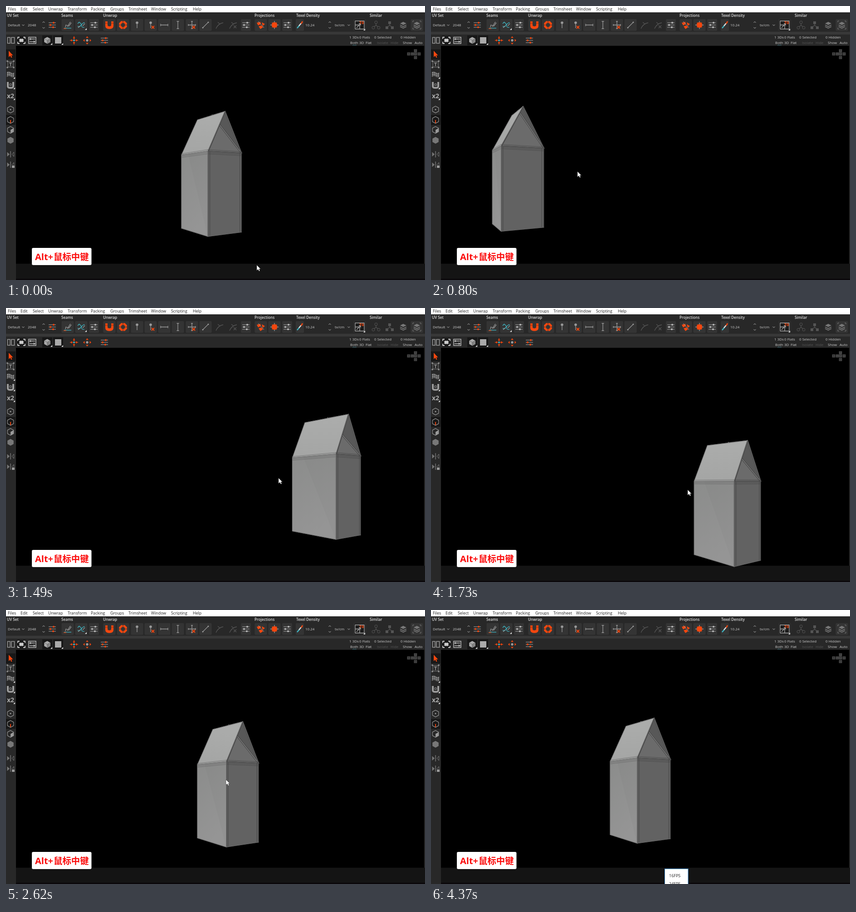
Write an HTML page that moves like this. It is 924x606 px and loops after 4660 ms.

```html
<!DOCTYPE html>
<html lang="en">
<head>
<meta charset="utf-8">
<title>Viewport panning</title>
<style>
html, body { margin: 0; height: 100%; overflow: hidden; background: #000 }
svg { display: block; width: 100vw; height: 100vh; font: 8px "Open Sans", "Noto Sans", sans-serif }
</style>
</head>
<body>
<svg id="stage" viewBox="0 0 924 606" preserveAspectRatio="none">
  <defs>
    <linearGradient id="wall" x2="0.35" y2="1"><stop stop-color="#8b8c8b"/><stop offset="1" stop-color="#959595"/></linearGradient>
    <linearGradient id="roof" x2="0" y2="1"><stop stop-color="#acadac"/><stop offset="1" stop-color="#a4a5a4"/></linearGradient>
  </defs>
  <g id="ui"></g>
  <g id="carton" stroke-linejoin="round" stroke-linecap="round"></g>
  <g id="popup">
    <rect x="515.5" y="572.5" width="51.5" height="40" fill="#fff" stroke="#3c8edb"/>
    <g fill="#222" font-size="9"><text x="525" y="591.3">16FPS</text><text x="525" y="609.3">24FPS</text></g>
  </g>
  <path id="cursor" d="M0 0V12L3 9.4 5 13.6 7 12.7 5.2 8.7H8.6Z" fill="#fff" stroke="#222" stroke-width=".5"/>
</svg>
<script>
const $ = id => document.getElementById(id);
const ORANGE = '#f4470f', GREY = '#9a9a9a', DIM = '#555', CYAN = '#3fb7c4';

// ---- static interface ----
const rect = (x, y, w, h, fill, more = '') => `<rect x="${x}" y="${y}" width="${w}" height="${h}" fill="${fill}" ${more}/>`;
const text = (x, y, s, fill = '#ccc', more = '') => `<text x="${x}" y="${y}" fill="${fill}" ${more}>${s}</text>`;
const dot = (x, y, r, fill) => `<circle cx="${x}" cy="${y}" r="${r}" fill="${fill}"/>`;
const stroke = (d, color = GREY, w = 1.3) => `<path d="${d}" fill="none" stroke="${color}" stroke-width="${w}"/>`;
const fill = (d, color) => `<path d="${d}" fill="${color}"/>`;
const at = (x, y, ...parts) => `<g transform="translate(${x} ${y})">${parts.join('')}</g>`;
const row = (y, items, color, more) => items.map(([x, s]) => text(x, y, s, color, more)).join('');
const button = (x, w = 27) => rect(x - w / 2, 29, w, 26, '#343434', 'rx="2"');
const chevron = (x, y, dir = 1) => at(x, y, stroke(`M-2.5 ${-dir}L0 ${1.5 * dir} 2.5 ${-dir}`, '#bbb', 1));
const sliders = (x, y, knob = '#bbb') => at(x, y,
  stroke('M-8-5H8M-8 0H8M-8 5H8', '#aaa', 1.2), dot(3, -5, 2, knob), dot(-4, 0, 2, knob), dot(2, 5, 2, knob));
const cross = (x, y) => at(x, y, stroke('M-3-3L3 3M3-3L-3 3', ORANGE, 1.8));
const corner = (x, y) => fill(`M${x} ${y}h-4l4-4z`, '#ddd');
const hexagon = 'M0-7.5L6.8-3.8V3.8L0 7.5-6.8 3.8V-3.8Z';
const arrows = inward => [0, 90, 180, 270].map(a => `<g transform="rotate(${a})">` +
  fill(inward ? 'M-2.7-6H-.8V-9H.8V-6H2.7L0-2.5Z' : 'M0-9L3-5.5H-3Z', ORANGE) + '</g>').join('');
const layers = x => at(x, 42, fill('M0-7L7-3.5 0 0-7-3.5Z', '#777'),
  stroke('M-7 0L0 3.5 7 0M-7 3.5L0 7 7 3.5', '#777', 1.8));

const panels = rect(0, 0, 924, 14, '#fff') + rect(0, 14, 924, 43, '#282828') + rect(0, 57, 924, 6, '#383838') +
  rect(0, 63, 924, 25, '#282828') + rect(0, 88, 22, 518, '#282828') + rect(22, 570, 902, 36, '#141414') +
  rect(22, 603, 902, 3, '#0b080b') + rect(922, 88, 2, 482, '#242424');

const labels =
  row(10.4, [[4, 'Files'], [32, 'Edit'], [59, 'Select'], [93, 'Unwrap'], [136, 'Transform'], [187, 'Packing'], [230, 'Groups'],
    [270, 'Trimsheet'], [320, 'Window'], [364, 'Scripting'], [412, 'Help']], '#222', 'font-size="8.8"') +
  row(23.8, [[2, 'UV Set'], [122, 'Seams'], [214, 'Unwrap'], [548, 'Projections'], [640, 'Texel Density'], [802, 'Similar']],
    '#ddd', 'font-weight="600" font-size="8.2"') +
  row(45, [[4, 'Default'], [48, '2048'], [660, '10.24'], [725, 'tx/cm']]) +
  row(72, [[757, '1 3Ds'], [779, '0 Flats'], [812, '0 Selected'], [870, '0 Hidden']]) +
  row(84, [[759, 'Both'], [779, '3D'], [793, 'Flat'], [875, 'Show'], [901, 'Auto']]) +
  row(84, [[818, 'Isolate'], [848, 'Hide']], DIM) + rect(764, 86, 9, 1, '#3d707a');

const topIcons =
  chevron(38, 42) + chevron(83, 36, -1) + chevron(83, 48) + chevron(714, 36, -1) + chevron(714, 48) + chevron(756, 42) +
  sliders(102, 42, ORANGE) +
  [136, 166, 228, 258, 289, 319, 349, 379, 410, 440, 562, 592, 780, 906].map(x => button(x)).join('') +
  [194, 529, 620].map(x => button(x, 22) + sliders(x, 42)).join('') + button(648, 18) +
  at(136, 42, stroke('M-8 7H8', CYAN), stroke('M-5 5L-4 0 2 2M-1 4L6-7M2 3L8-5'), stroke('M-9 8H-3', ORANGE)) +
  at(166, 42, stroke('M-7-5Q-1-7 0 0T7 5M-7 2Q-7 8 0 0T7-4M-8-3L-4-7', CYAN), stroke('M3 2L8-3M-7 6L-3 2')) + corner(178, 53) +
  at(228, 42, fill('M-9-8H-4V0Q-4 3 0 3T4 0V-8H9V2Q9 9 0 9T-9 2Z', ORANGE), stroke('M-9-4H-4M4-4H9', '#8d2a0a', 1)) +
  at(258, 42, stroke('M-3-6.5H3L6.5-3V3L3 6.5H-3L-6.5 3V-3Z', ORANGE, 4.5), stroke('M-9 0H-4M4 0H9M0-9V-4M0 4V9', '#343434', 1)) +
  [289, 319].map(x => at(x, 42, dot(0, -5, 2.8, GREY), stroke('M0-4V7'))).join('') + cross(324, 47) +
  at(349, 42, stroke('M-8 0H8M-8-2.5V2.5M8-2.5V2.5')) +
  at(379, 42, stroke('M0-8V8M-2.5-8H2.5M-2.5 8H2.5')) +
  at(410, 42, stroke('M-8 0H8M0-8V8M-8-2V2M8-2V2M-2-8H2M-2 8H2')) + cross(414, 47) +
  at(440, 42, stroke('M-6 6L6-6'), dot(-6, 6, 1.5, GREY), dot(6, -6, 1.5, GREY)) +
  [471, 501].map(x => at(x, 42, stroke('M-8 8Q-3-3 8-5M-4-6L1-2', DIM))).join('') + at(505, 46, stroke('M-3-3L3 3M3-3L-3 3', DIM)) +
  at(562, 42, fill('M-9-5L-1-7 0-2-6 1ZM2-6L9-2 4 2ZM-5 3L1 1 5 5-1 9Z', ORANGE), stroke('M-6-8L7 6', GREY, 1)) +
  at(592, 42, stroke('M-9 0H9M0-9V9'), dot(0, 0, 6, ORANGE), stroke('M-5-5H5V5H-5Z', ORANGE, 1)) +
  at(648, 42, stroke('M-6 7L-1 1', CYAN, 2.5), stroke('M-2 2L3-4', '#ddd', 2.5), stroke('M3-3L6-8', ORANGE, 2.5)) +
  rect(768, 30, 24, 24, '#1c1c1c') +
  at(780, 42, stroke('M-10-9H10V9H-10ZM-10 0H0V9M-7 6L2-3M-2-3H2V1', '#aaa'), text(-1, -2, 'T0', ORANGE, 'font-size="9" font-weight="700"')) + corner(792, 54) +
  at(816, 42, stroke('M0-3V1M-5 4L0 1 5 4', DIM), ...[[0, -6], [-6, 6], [6, 6]].map(([x, y]) => `<circle cx="${x}" cy="${y}" r="3" fill="none" stroke="${DIM}"/>`)) +
  at(846, 42, stroke('M0-3V1M-5 4L0 1 5 4', DIM), ...[[0, -5], [-6, 6], [6, 6]].map(([x, y]) => rect(x - 3, y - 3, 6, 6, DIM))) +
  layers(876) + layers(906) + at(906, 42, stroke('M-9-6V-9H-6M6-9H9V-6M9 6V9H6M-6 9H-9V6', '#777', 1));

const viewIcons =
  at(11, 76, stroke('M-7.5-6.5H-2V6.5H-7.5ZM1-6.5H7.5V6.5H1Z', GREY, 1.6)) +
  rect(24, 66, 20, 20, '#181818') + at(34, 76, stroke('M-8-3V-7H-4M4-7H8V-3M8 3V7H4M-4 7H-8V3', '#ccc', 1.8), rect(-4.5, -3.5, 9, 7, '#ccc')) +
  at(58, 76, stroke('M-8-7H8V7H-8ZM-6-3H6M-6 3H6M-3-5L-6-3-3-1M3 1L6 3 3 5', '#bbb', 1.5)) +
  rect(80, 65, 22, 22, '#171717') + rect(104, 65, 22, 22, '#171717') +
  at(91, 76, fill(hexagon, '#aaa'), fill('M0 0L6.8-3.8V3.8L0 7.5Z', '#858585'), stroke('M-6.8-3.8L0 0 6.8-3.8M0 0V7.5', '#555', .7)) +
  rect(108, 69, 14, 14, '#aaa') + corner(102, 86) + corner(126, 86) +
  at(150, 76, arrows(true), dot(0, 0, 2, CYAN)) + at(179, 76, arrows(false), dot(0, 0, 2.7, GREY)) + sliders(217, 76, ORANGE);

const sideIcons =
  rect(0, 96, 21, 22, '#181818') + fill('M6 99V113L9.3 110 11.5 114.5 13.5 113.5 11.4 109.2H15.5Z', ORANGE) +
  at(10, 129, stroke('M-6-6H6V6H-6Z', '#888', 1), ...[[-7, -7], [7, -7], [-7, 7], [7, 7]].map(([x, y]) => rect(x - 1.5, y - 1.5, 3, 3, '#999')), stroke('M-3-3H3M0-3V4', '#999', 1.6)) +
  at(10, 152, fill('M-8-6Q-3-8 1-5T8-5V5Q4 7 0 4T-8 5Z', '#858585'), stroke('M-8-2Q-3-4 1-1T8-1M-8 2Q-3 0 1 3T8 2M-4-7V4M0-6V5M4-5V6', '#333', .7)) + corner(20, 161) +
  at(10, 175, stroke('M-6-7V3Q-6 6 0 6T6 3V-7', GREY, 4), stroke('M-2-3H2V1H-2Z', GREY, 1)) + corner(20, 184) +
  text(2, 204, 'x2', '#aaa', 'font-size="14" font-weight="700"') + corner(20, 208) +
  rect(0, 241, 21, 22, '#181818') +
  [229, 252, 274].map(y => at(10, y, stroke(hexagon, GREY, 1.1))).join('') + dot(10, 229, 1.6, GREY) +
  stroke('M10 252V259', ORANGE, 1.8) + at(10, 274, fill('M0 0L6.8-3.8V3.8L0 7.5Z', GREY)) + at(10, 297, fill(hexagon, '#777')) +
  [328, 351].map(y => at(10, y, fill('M-7.5-5V5L-2 0Z', '#777'), stroke('M0-7V7', GREY, 1), stroke('M7.5-5V5L3 0Z', '#777', 1))).join('') + rect(13, 353, 6, 5, GREY);

const compass = [[888, 106, 'B'], [896, 106, 'L'], [903, 106, 'F'], [911, 106, 'R'], [903, 99, 'T'], [903, 114, 'D']]
  .map(([x, y, s]) => rect(x - 3.4, y - 3.4, 6.8, 6.8, '#484848') + text(x, y + 2, s, '#161616', 'font-size="5.5" text-anchor="middle"')).join('');

const caption = rect(57, 535, 131.5, 38, '#fff', 'rx="3"') +
  `<g fill="#fb0d0d" font-weight="700" font-size="19.4"><text x="64" y="562" font-size="20">Alt+</text>
   <text x="105" y="562" style="font-family:'Noto Sans CJK SC','Noto Sans CJK',sans-serif">鼠标中键</text></g>`;

$('ui').innerHTML = panels + labels + topIcons + viewIcons + sideIcons + compass + caption;

// ---- carton: corners at the resting pose as [x, y, perspective factor] ----
const REST = [492, 239];
const corners = {
  apex: [492, 239, 1], back: [430, 257, .871], fold: [463, 247, .936],
  left: [395, 335, .899], front: [454.5, 327, 1.038], right: [528, 331, .966],
  leftBase: [395, 497, .899], frontBase: [454.5, 516, 1.038], rightBase: [528, 506, .966]
};

function drawCarton(x, y) {
  const p = {};
  for (const name in corners) {
    const [cx, cy, k] = corners[name];
    p[name] = [cx + k * (x - REST[0]), cy + k * (y - REST[1]), k];
  }
  const { apex, back, fold, left, front, right, leftBase, frontBase, rightBase } = p;
  const path = pts => 'M' + pts.map(q => q[0].toFixed(2) + ' ' + q[1].toFixed(2)).join('L');
  const face = (color, edge, ...pts) => `<path d="${path(pts)}Z" fill="${color}" stroke="${edge}" stroke-width="1.2"/>`;
  const line = (color, w, ...pts) => stroke(path(pts), color, w);
  const shift = (q, dx, dy = 0) => [q[0] + dx * q[2], q[1] + dy * q[2], q[2]];
  const mix = (a, b, f) => a.map((v, i) => v + (b[i] - v) * f);

  let out = face('#585858', '#484848', apex, fold, right) + face('#6b6b6b', '#555', front, fold, right) +
    line('#3d3d3d', 3.4, fold, right) + line('#858585', 1.4, fold, right) +
    line('#444', 2.6, apex, right) + line('#707070', 1, apex, right) +
    face('url(#roof)', '#7b7b7b', left, front, apex, back) +
    face('url(#wall)', '#777', left, front, frontBase, leftBase) +
    face('#626262', '#484848', front, right, rightBase, frontBase) +
    `<path d="${path([mix(left, front, .25), front, frontBase])}Z" fill="#000" opacity=".025"/>`;

  for (const d of [-3, 0, 3, 6])
    out += line('#686868', .8, shift(left, 0, d), shift(front, 0, d)) + line('#474747', .8, shift(front, 0, d), shift(right, 0, d));

  const rim = mix(front, right, .95), rimBase = mix(frontBase, rightBase, .95);
  return out + line('#444', 2.4, shift(front, 1), shift(apex, 0, 1)) + line('#7c7c7c', .8, front, apex) +
    line('#777', 1.2, front, frontBase) + line('#484848', 1, shift(front, 1.7), shift(frontBase, 1.7)) +
    line('#474747', .9, shift(front, 4.5, 2), shift(frontBase, 4.5, -2)) +
    line('#454545', .9, rim, rimBase) + line('#757575', .8, leftBase, frontBase, rightBase) + line('#777', .8, back, apex);
}

// ---- motion: the picture advances in 40 ms steps inside these spans ----
const spans = [[40, 320], [680, 800], [1090, 1610], [1690, 2210], [2250, 2330], [2620, 2820], [3400, 3920]];
const cartonKeys = [[0, 483, 233], [640, 483, 233], [800, 203, 222], [1050, 203, 222], [1290, 548, 170], [1330, 548, 170],
  [1450, 745, 215], [1490, 755, 235], [1610, 732, 284], [1650, 732, 284], [1730, 698, 293], [1930, 544, 144],
  [2050, 528, 88], [2210, 524, 94], [2330, 525, 251], [2580, 525, 251], [2620, 522, 247], [2820, 492, 239]];
const cursorKeys = [[0, 553, 573], [320, 465, 371], [640, 465, 371], [800, 323, 366], [1050, 323, 366], [1290, 561, 339], [1330, 561, 339],
  [1450, 604, 368], [1610, 592, 400], [1650, 592, 400], [1730, 566, 402], [1930, 494, 314], [2050, 486, 283], [2210, 485, 287],
  [2330, 487, 377], [2580, 487, 377], [2620, 485, 375], [2820, 470, 374], [3360, 470, 374], [3720, 674, 514], [3880, 722, 592], [3920, 722, 612]];

function stepped(t) {
  const span = spans.findLast(s => s[0] <= t);
  return span ? Math.min(span[1], span[0] + 40 * Math.floor((t - span[0]) / 40)) : 0;
}

function sample(keys, t) {
  const i = keys.findIndex(k => k[0] > t);
  if (i < 0) return keys.at(-1).slice(1);
  const [t0, x0, y0] = keys[i - 1], [t1, x1, y1] = keys[i], f = (t - t0) / (t1 - t0);
  return [x0 + (x1 - x0) * f, y0 + (y1 - y0) * f];
}

function render() {
  const t = performance.now() % 4660, s = stepped(t);
  $('carton').innerHTML = drawCarton(...sample(cartonKeys, s));
  $('cursor').setAttribute('transform', `translate(${sample(cursorKeys, s)})`);
  $('popup').style.display = t >= 4370 ? '' : 'none';
  requestAnimationFrame(render);
}
render();
</script>
</body>
</html>
```
